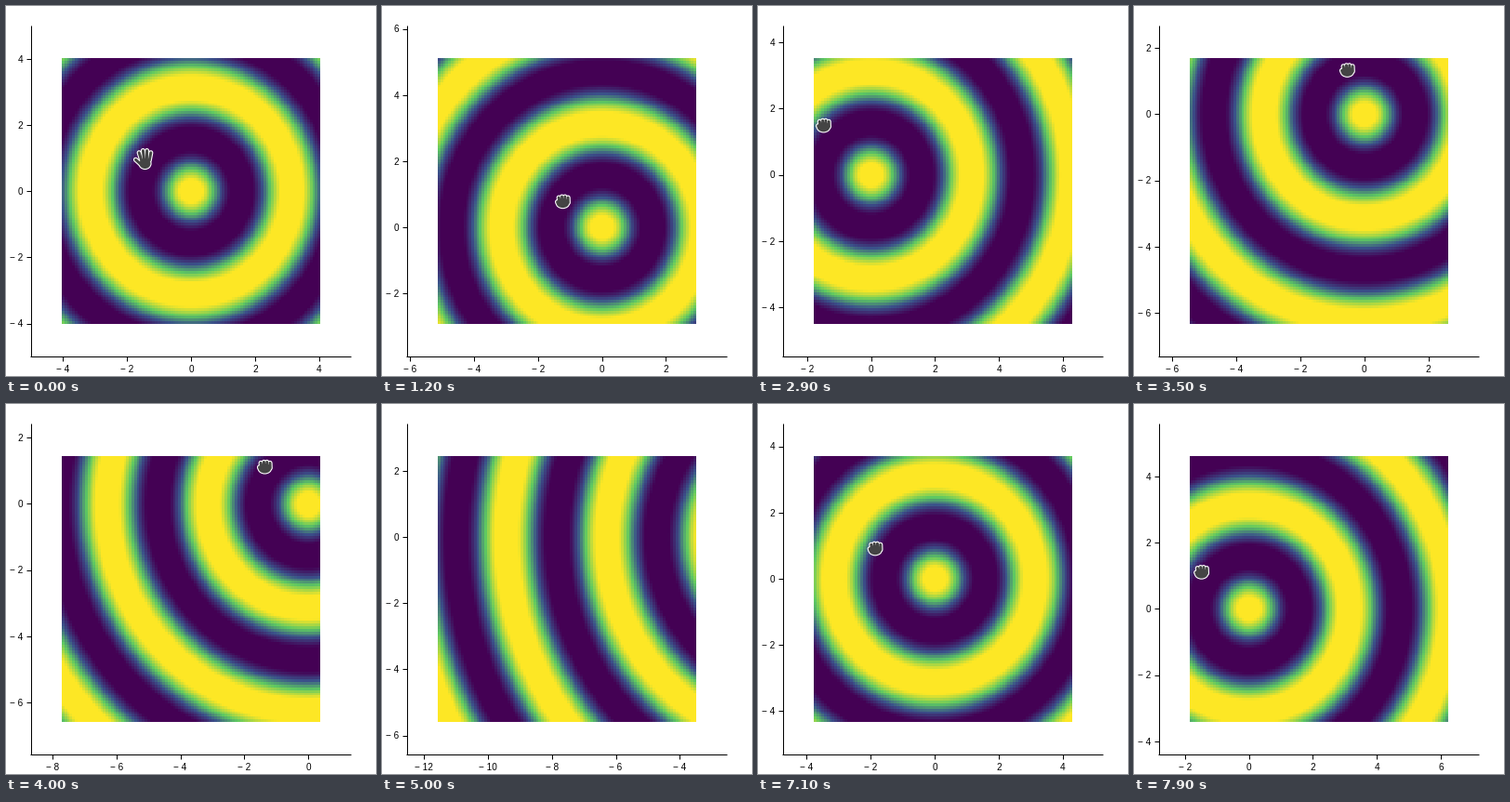
Animation, 398 px wide and 398 px high, one loop 8000 ms. Source, as a matplotlib script:

```python
import numpy as np
import matplotlib.pyplot as plt
from matplotlib.animation import FuncAnimation
from matplotlib.colors import LinearSegmentedColormap
from matplotlib.patches import Ellipse
from matplotlib.transforms import Affine2D

SIZE, DPI, STEP, FRAMES = 398, 100, 100, 80
PX = 72 / DPI                         # one pixel in points
LEFT, RIGHT, TOP, BOTTOM = 26.5, 371, 20.5, 376.5
MID = np.array([198.8, 199.0])
UNIT = np.array([34.4, 35.6])         # pixels per data unit
GRAB = np.array([-50.0, -40.5])       # hand position relative to the ripple centre
DARK = "#444444"
HOME, CORNER, FAR = (199, 199.2), (265, 289), (458, 143)
REST = (325.2, 107.3)

# Each drag eases through a few points: (time, (x, y) of the ripple centre)
DRAGS = [
    [(400, HOME), (1100, (229, 226)), (1600, CORNER)],
    [(1950, CORNER), (2200, (235.6, 282.6)), (2500, (164, 235)),
     (2900, (121.6, 181.6)), (3300, (190, 132)), (3700, (300, 107.3)), (4000, REST)],
    [(4100, REST), (5000, FAR)],
    [(5850, FAR), (6300, (374, 143)), (6700, (258, 156)),
     (7100, (190, 188)), (7900, (123.6, 220.4))],
]


def glide(drag, t):
    """Smooth path through the points, at rest at both ends."""
    times = np.array([k for k, _ in drag], float)
    xy = np.array([p for _, p in drag], float)
    t = np.clip(t, times[0], times[-1])
    slope = np.gradient(xy, times, axis=0)
    slope[[0, -1]] = 0
    i = min(np.searchsorted(times, t, side="right") - 1, len(times) - 2)
    h = times[i + 1] - times[i]
    s = (t - times[i]) / h
    return (xy[i] * (1 + 2 * s) * (1 - s) ** 2 + xy[i + 1] * s * s * (3 - 2 * s)
            + h * slope[i] * s * (1 - s) ** 2 + h * slope[i + 1] * s * s * (s - 1))


def state(t):
    """Ripple centre and hand position; the hand runs one step ahead."""
    drag = [d for d in DRAGS if t > d[0][0] or d is DRAGS[0]][-1]
    t = min(t, drag[-1][0])
    centre = glide(drag, t)
    return centre, 2 * centre - glide(drag, t - STEP) + GRAB


def four_colours():
    """Four colours blended between the middles of four equal cells."""
    cells = ["#440154", "#3b528b", "#5ec962", "#fde725"]
    stops = [((i + 0.5) / 4, c) for i, c in enumerate(cells)]
    return LinearSegmentedColormap.from_list(
        "ripple", [(0, cells[0]), *stops, (1, cells[-1])])


fig = plt.figure(figsize=(SIZE / DPI, SIZE / DPI), dpi=DPI, facecolor="white")
ax = fig.add_axes([0, 0, 1, 1])
ax.axis("off")

lin = np.linspace(-4, 4, 100)
image = ax.imshow(np.zeros((100, 100)), cmap=four_colours(), vmin=0, vmax=1,
                  interpolation="nearest", aspect="auto", zorder=1,
                  extent=(60, 338, 342, 56))
ax.set_xlim(0, SIZE)
ax.set_ylim(SIZE, 0)


def stroke(xs, ys, width=1.0, color="black", cap="butt", **kw):
    return ax.plot(xs, ys, color=color, lw=width * PX, solid_capstyle=cap, **kw)[0]


stroke([LEFT, LEFT], [TOP, BOTTOM + 0.5])
stroke([LEFT - 0.5, RIGHT], [BOTTOM, BOTTOM])


def label(n, ha):
    text = f"\u2212 {-n}" if n < 0 else str(n)
    return ax.text(0, 0, text, family="Liberation Sans", size=10 * PX,
                   ha=ha, va="baseline", color="black")


def make_ticks(ha):
    return [(n, stroke([], []), label(n, ha)) for n in range(-14, 11, 2)]


x_ticks, y_ticks = make_ticks("center"), make_ticks("right")
hand_move = Affine2D()


def make_hand(palm, size, thumb, gap, spread, reach, curve):
    """A round palm, a thumb and four fingers, dark on a white rim."""
    k = np.arange(4) - 1.5
    tips = zip(1.5 + gap * k, 1 + spread * k, curve * k ** 2 - reach)
    limbs = [([x0, x1], [1.5, y1]) for x0, x1, y1 in tips] + [thumb]
    move = hand_move + ax.transData
    parts = []
    for color, rim, z in (("white", 2.2, 5), (DARK, 0, 6)):
        parts.append(ax.add_patch(Ellipse(palm, size[0] + rim, size[1] + rim, lw=0,
                                          facecolor=color, zorder=z, transform=move)))
        parts += [stroke(xs, ys, 3 + rim, color, "round", zorder=z, transform=move)
                  for xs, ys in limbs]
    return parts


open_hand = make_hand((1, 4.8), (12, 11), ([-3, -9], [6, 0.6]), 2.8, 4.2, 9.4, 1.1)
closed_hand = make_hand((0.3, 1.8), (13.5, 10.5), ([-4, -5.6], [3, 0.6]),
                        3.1, 3.3, 5.1, 0.5)


def place(mark, text, xs, ys, spot, visible):
    mark.set_data(xs, ys)
    text.set_position(spot)
    mark.set_visible(visible)
    text.set_visible(visible)


def draw(frame):
    t = frame * STEP
    centre, hand = state(t)
    if t < 300:
        hand = np.array([148.5, 164.7 if t < 200 else 157.5])

    shift = (MID - centre) / UNIT
    r = np.hypot(lin[None, :] + shift[0], lin[:, None] + shift[1])
    image.set_data(np.cos(r) ** 2)

    for n, mark, text in x_ticks:
        x = centre[0] + n * UNIT[0]
        place(mark, text, [x, x], [BOTTOM, BOTTOM + 5], (x, 394.3),
              LEFT <= x <= RIGHT)
    for n, mark, text in y_ticks:
        y = centre[1] - n * UNIT[1]
        place(mark, text, [LEFT - 5, LEFT], [y, y], (18.3, y + 3.8),
              TOP <= y <= BOTTOM)

    hand_move.clear().translate(*hand)
    for part in open_hand:
        part.set_visible(t < 300)
    for part in closed_hand:
        part.set_visible(t >= 300)
    return []


anim = FuncAnimation(fig, draw, frames=FRAMES, interval=STEP,
                     init_func=lambda: draw(0), repeat=True, repeat_delay=0, blit=False)
plt.show()
```
